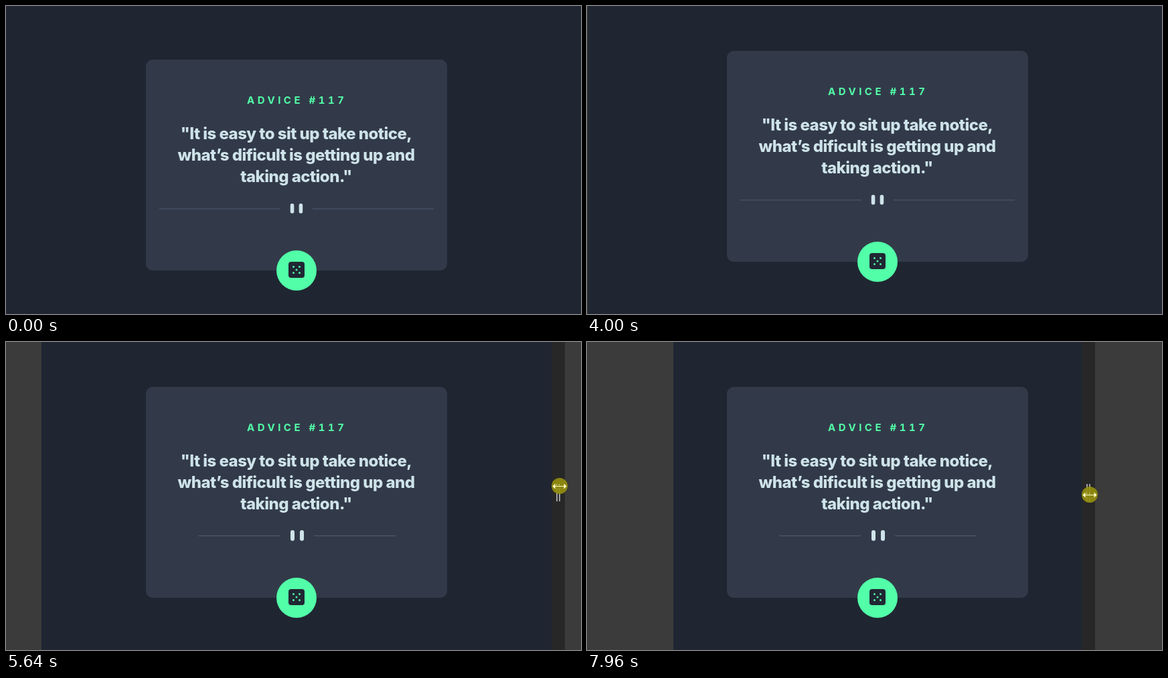
Animation, 859 px wide and 460 px high, one loop 8000 ms. Source, as an HTML page with a canvas:

```html
<!DOCTYPE html>
<html lang="en">
<head>
<meta charset="utf-8">
<title>Advice card</title>
<style>
  html, body { margin: 0; width: 100%; height: 100%; overflow: hidden; background: #1f2632; }
  canvas, svg { position: absolute; left: 0; top: 0; width: 859px; height: 460px; }
  text { font-family: Inter, "Open Sans", sans-serif; }
  .label { font-size: 15px; font-weight: 700; letter-spacing: 4.5px; font-variant-numeric: tabular-nums; fill: #52ffa8; }
  .quote { font-size: 24px; font-weight: 800; letter-spacing: -0.54px; text-anchor: middle; fill: #cee3e9; }
</style>
</head>
<body>
<canvas id="stage" width="859" height="460"></canvas>
<svg viewBox="0 0 859 460">
  <g id="words">
    <text class="label" x="360" y="146">ADVICE #117</text>
    <text class="quote" x="433.5" y="199">"It is easy to sit up take notice,</text>
    <text class="quote" x="433.5" y="231">what’s dificult is getting up and</text>
    <text class="quote" x="433.5" y="263">taking action."</text>
  </g>
</svg>
<script>
const W = 859, H = 460, LOOP = 8000, TICK = 71.4, CUT = 4000, ENTER = 1280;
const MID = 434, BREAKPOINT = 768;
const DARK = '#1f2632', CARD = '#323a49', GREEN = '#52ffa8', CYAN = '#cee3e9', LINE = '#4f5d74';
const OUTSIDE = '#3b3b3b', HANDLE = '#272728', GLYPH = '#fffcc8';

const ctx = document.getElementById('stage').getContext('2d');
const words = document.getElementById('words');

// How far a move is done, 0 to 1
const progress = (t, start, length) => Math.min(1, Math.max(0, (t - start) / length));

// The pointer glides in to the button, then swings away once and returns.
function pointerAt(t) {
  const left = (1 - progress(t, ENTER, 1064)) ** 3;
  const swing = Math.sin(Math.PI * progress(t, 2280, 1010)) ** 2;
  return [MID + 350 * left + 87 * swing, 386 - 60 * left + 26 * swing].map(Math.round);
}

// The window edge is pulled inwards in four drags.
const drags = [
  { start: 4380, length: 680, by: 36 },
  { start: 5290, length: 350, by: 16 },
  { start: 6220, length: 570, by: 28 },
  { start: 6930, length: 800, by: 48 }
];

function leftEdge(t) {
  return Math.round(drags.reduce((x, d) => x + d.by * progress(t, d.start, d.length), 1));
}

function rect(x, y, w, h, color) {
  ctx.fillStyle = color;
  ctx.fillRect(x, y, w, h);
}

function rounded(x, y, w, h, r, color) {
  ctx.fillStyle = color;
  ctx.beginPath();
  ctx.roundRect(x, y, w, h, r);
  ctx.fill();
}

function disc(x, y, r, color) {
  ctx.fillStyle = color;
  ctx.beginPath();
  ctx.arc(x, y, r, 0, Math.PI * 2);
  ctx.fill();
}

function poly(points) {
  ctx.beginPath();
  points.forEach(([x, y]) => ctx.lineTo(x, y));
  ctx.closePath();
}

// Black outline around the white union of the current path
function outlined() {
  ctx.strokeStyle = '#000';
  ctx.lineWidth = 2;
  ctx.stroke();
  ctx.fillStyle = '#fff';
  ctx.fill();
}

function divider(narrow) {
  const width = narrow ? 295 : 444, scale = narrow ? 1 : 410 / 444;
  const arm = narrow ? 122 : 196, bar = narrow ? 138 : 212;
  ctx.save();
  ctx.translate(narrow ? 287 : 229, narrow ? 294 : 295);
  ctx.scale(scale, scale);
  for (const x of [0, width - arm]) rect(x, 8, arm, 1, LINE);
  for (const x of [bar, bar + 14]) rounded(x, 0, 6, 16, 3, CYAN);
  ctx.restore();
}

function button(glow) {
  ctx.save();
  if (glow) {
    ctx.shadowColor = 'rgba(82,255,168,0.8)';
    ctx.shadowBlur = 20;
    ctx.shadowOffsetY = 5;
  }
  disc(MID, 395, 30, GREEN);
  ctx.restore();
  rounded(MID - 12, 382, 24, 24, 4, '#202733');
  disc(MID, 394, 1.5, GREEN);
  for (const dx of [-4.5, 4.5])
    for (const dy of [-4.5, 4.5]) disc(MID + dx, 394 + dy, 1.5, GREEN);
}

function card(dy, narrow, glow) {
  ctx.save();
  ctx.translate(0, dy);
  rounded(209, 80, 450, 315, 10, CARD);
  divider(narrow);
  button(glow);
  ctx.restore();
  words.setAttribute('transform', `translate(0 ${dy})`);
}

function arrow(x, y) {
  ctx.save();
  ctx.translate(x + 0.5, y + 1);
  poly([[0, 0], [0, 15.5], [3.6, 12.4], [6.2, 18.2], [8.6, 17.2], [6.2, 11.4], [11, 11.2]]);
  outlined();
  ctx.restore();
}

function hand(x, y) {
  ctx.save();
  ctx.translate(x - 5.5, y + 0.5);
  ctx.beginPath();
  ctx.roundRect(4, 0, 3, 14, 1.5);
  for (let i = 0; i < 3; i++) ctx.roundRect(7 + 3 * i, 6 + i, 3, 8, 1.5);
  ctx.roundRect(4, 10, 12, 11, 4);
  ctx.roundRect(0, 10, 6, 4, 2);
  outlined();
  ctx.restore();
}

function resizer(x, y) {
  for (const dx of [-3, 1]) rect(x + dx, 212, 2, 26, '#a0a0a0');
  const cx = x + 2;
  disc(cx, y, 12, 'rgba(148,142,14,0.92)');
  for (const dx of [-5, -1]) rect(cx + dx, y - 3, 1, 2, '#d6d28c');
  rect(cx - 8, y, 16, 1, GLYPH);
  for (const side of [-1, 1]) {
    poly([[cx + side * 10.5, y + 0.5], [cx + side * 6.5, y - 3.5], [cx + side * 6.5, y + 4.5]]);
    ctx.fill();
  }
}

function pointerScene(t) {
  const shown = t >= ENTER;
  const [x, y] = pointerAt(t);
  const over = shown && Math.hypot(x - MID, y - 395) < 30;
  card(0, false, over);
  if (shown) (over ? hand : arrow)(x, y);
}

function resizeScene(t) {
  const left = leftEdge(t), right = 2 * MID - left;
  card(-13, right - left <= BREAKPOINT, false);
  rect(0, 0, left, H, OUTSIDE);
  rect(right, 0, 20, H, HANDLE);
  rect(right + 20, 0, W, H, OUTSIDE);
  resizer(right + 10, Math.round(215 + 13 * progress(t, 6930, 800)));
}

function draw(now) {
  const t = now % LOOP;
  const stepped = Math.floor((t + 15) / TICK) * TICK;
  rect(0, 0, W, H, DARK);
  (t < CUT ? pointerScene : resizeScene)(stepped);
  requestAnimationFrame(draw);
}
requestAnimationFrame(draw);
</script>
</body>
</html>
```
